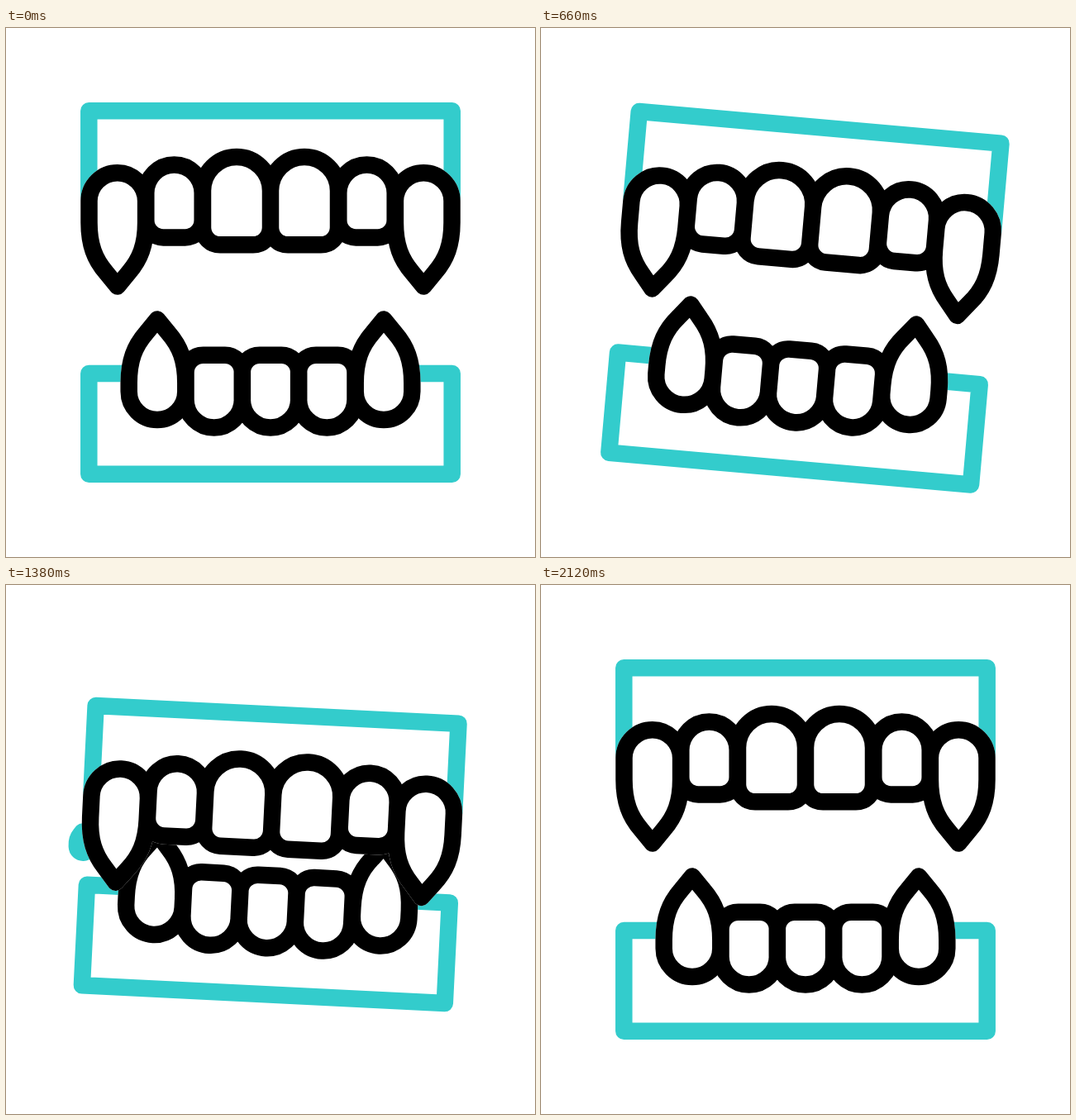
Write an HTML page with a canvas that moves like this. It is 640 px wide and 640 px high and loops after 2.4 s.

```html
<!DOCTYPE html>
<html lang="en">
<head>
<meta charset="utf-8">
<title>Biting fangs</title>
<style>
  html, body { margin: 0; width: 100%; height: 100%; overflow: hidden; background: #fff; }
  canvas { display: block; width: 640px; height: 640px; }
</style>
</head>
<body>
<canvas id="stage" width="640" height="640"></canvas>
<script>
const ctx = document.getElementById('stage').getContext('2d');
const LOOP = 2400, MID = 320, LINE = 20.5, TEAL = '#33cccc';

// Keys: [time, value], eased in and out
const TURN = [[0, 0], [480, 15.25], [872, -7.8], [1255, 3.7], [1655, 0]];
const UPPER = [[25, 0], [500, 71.3], [855, -49.6], [1270, 72.3], [1636, 0]];
const LOWER = [[25, 0], [500, -56], [855, 60.7], [1270, -56.8], [1636, 0]];

function valueAt(keys, t) {
  if (t <= keys[0][0]) return keys[0][1];
  for (let i = 1; i < keys.length; i++) {
    const [t0, a] = keys[i - 1], [t1, b] = keys[i];
    if (t < t1) {
      const u = (t - t0) / (t1 - t0);
      return a + (b - a) * u * u * (3 - 2 * u);
    }
  }
  return keys[keys.length - 1][1];
}

// Round end at (x, y) with radius r, point towards dir (1 down, -1 up)
function fang(p, x, y, r, straight, dir) {
  const at = (u, v) => [x + u * r, y + dir * (straight + v * r)];
  p.moveTo(x - r, y);
  p.arc(x, y, r, Math.PI, 0, dir < 0);
  p.lineTo(...at(1, 0));
  p.bezierCurveTo(...at(1, 0.79), ...at(0.8, 1.3), ...at(0.4, 1.76));
  p.lineTo(...at(0, 2.25));
  p.lineTo(...at(-0.4, 1.76));
  p.bezierCurveTo(...at(-0.8, 1.3), ...at(-1, 0.79), ...at(-1, 0));
  p.closePath();
}

// Domed tooth: dome centre at (x, y), flat edge at flatY
function tooth(p, x, y, r, flatY) {
  p.moveTo(x - r, y);
  p.arc(x, y, r, Math.PI, 0, flatY < y);
  p.arcTo(x + r, flatY, x, flatY, 21);
  p.arcTo(x - r, flatY, x - r, y, 21);
  p.closePath();
}

function mirrored(x, draw) {
  draw(x);
  draw(2 * MID - x);
}

const upperTeeth = new Path2D();
mirrored(279, x => tooth(upperTeeth, x, 197, 41, 262.3));
mirrored(203.5, x => tooth(upperTeeth, x, 199.7, 34.2, 253.4));
mirrored(134.8, x => fang(upperTeeth, x, 209.5, 34.3, 25.8, 1));

const lowerTeeth = new Path2D();
for (const x of [251.7, 320, 388.3]) tooth(lowerTeeth, x, 449.4, 34.2, 395.7);
mirrored(183, x => fang(lowerTeeth, x, 439.8, 34.3, 10.2, -1));

const upperGum = new Path2D('M100.3 209V100.3H539.7V209');
const lowerGum = new Path2D('M150 418H100.3V539.7H539.7V418H490');

function stroke(path, color) {
  ctx.strokeStyle = color;
  ctx.stroke(path);
}

function solid(path, color) {
  ctx.fillStyle = '#fff';
  ctx.fill(path);
  stroke(path, '#fff');
  stroke(path, color);
}

function jaw(gum, teeth, angle, shift) {
  ctx.save();
  ctx.translate(MID, MID);
  ctx.rotate(angle);
  ctx.translate(-MID, shift - MID);
  stroke(gum, TEAL);
  solid(teeth, '#000');
  ctx.restore();
}

function drop(t) {
  const dt = t - 1272;
  if (dt <= 0 || t >= 2120) return;
  const r = 0.067 * Math.min(dt, 462);
  const x = 93 - 0.0175 * (Math.min(dt, 360) - 108);
  const y = 283.6 + 0.215 * dt + 0.000345 * dt * dt;
  const path = new Path2D();
  fang(path, 0, 0.72 * r, r, 0.19 * r, -1);
  ctx.save();
  ctx.translate(x, y);
  ctx.rotate(-0.04);
  solid(path, TEAL);
  ctx.restore();
}

function draw(t) {
  ctx.fillStyle = '#fff';
  ctx.fillRect(0, 0, 640, 640);
  ctx.lineWidth = LINE;
  ctx.lineJoin = 'round';
  const angle = valueAt(TURN, t) * Math.PI / 180;
  jaw(lowerGum, lowerTeeth, angle, valueAt(LOWER, t));
  drop(t);
  jaw(upperGum, upperTeeth, angle, valueAt(UPPER, t));
}

function tick() {
  draw(performance.now() % LOOP);
  requestAnimationFrame(tick);
}
tick();
</script>
</body>
</html>
```
